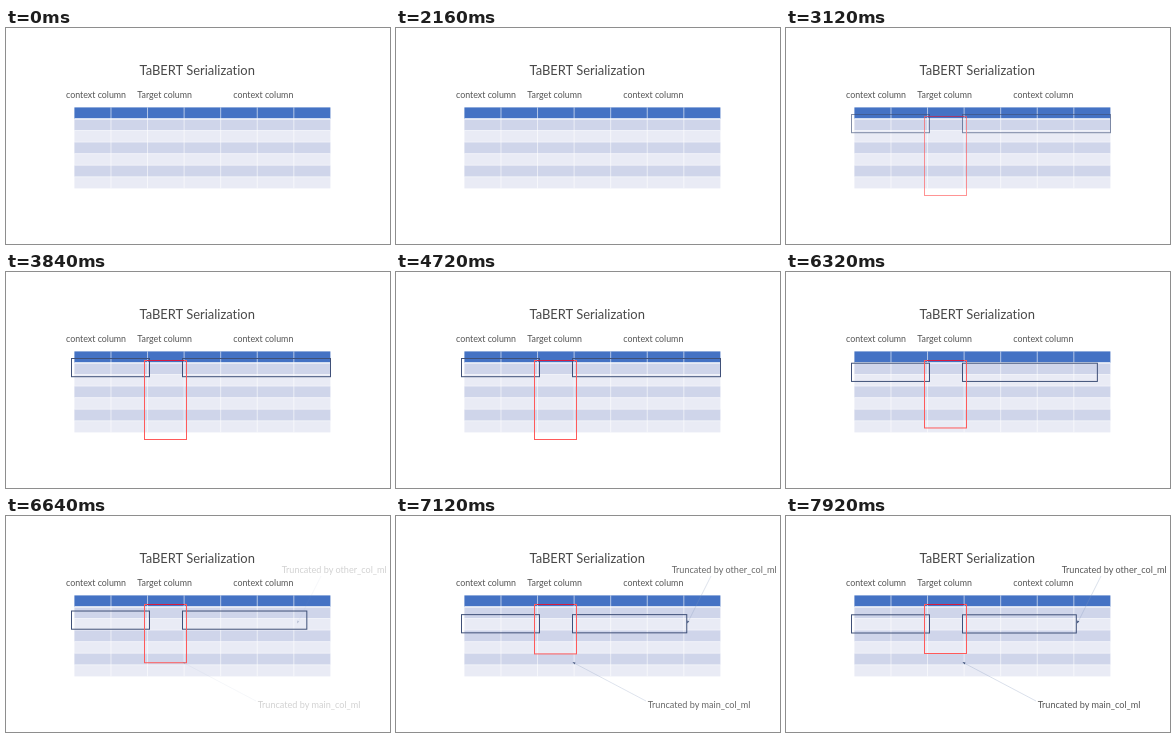
Animation of 384 by 216 pixels, one loop 8000 ms. Source, as an HTML page:

```html
<!DOCTYPE html>
<html lang="en">
<head>
<meta charset="utf-8">
<title>TaBERT Serialization</title>
<style>
  html, body { margin: 0; width: 100%; height: 100%; overflow: hidden; background: #fff; }
  svg { display: block; width: 100vw; height: 100vh; }
  text { font: 8.85px Lato, sans-serif; font-variant-ligatures: none; fill: #555; }
  text.title { font-size: 12.95px; fill: #484848; text-anchor: middle; }
  text.note { font-size: 9.1px; }
  #boxes { fill: none; stroke: #3f5078; stroke-width: 1; }
  #target { stroke: #ff5a5a; }
  #targetTop { stroke: #d41c40; }
  .arrow { stroke: #8095bb; stroke-width: .3; }
  .head { fill: #44577f; }
</style>
</head>
<body>
<svg viewBox="0 0 384 216">
  <text class="title" x="191.2" y="47">TaBERT Serialization</text>
  <text x="60" y="70">context column</text>
  <text x="131.3" y="70">Target column</text>
  <text x="227.3" y="70">context column</text>
  <g id="table"></g>
  <g id="boxes">
    <rect id="left" x="65.5" width="78"/>
    <rect id="right" x="176.5"/>
    <rect id="target" x="138.5" y="88.5" width="42"/>
    <path id="targetTop" d="M141 88.5H178"/>
  </g>
  <g id="notes">
    <text class="note" x="275.7" y="57">Truncated by other_col_ml</text>
    <text class="note" x="251.7" y="192">Truncated by main_col_ml</text>
    <path class="arrow" d="M315 60L292 106M250 185L178 147"/>
    <path class="head" d="M291 107.5l.2-3 2.2 1zM176.5 146l3 .4-1 2z"/>
  </g>
</svg>
<script>
const LOOP = 8000;
const $ = id => document.getElementById(id);
const clamp = v => Math.min(1, Math.max(0, v));
const span = (t, from, to) => clamp((t - from) / (to - from));
const mix = (a, b, p) => a + (b - a) * p;
const easeInOut = u => (1 - Math.cos(Math.PI * u)) / 2;

function set(id, attrs) {
  for (const name in attrs) $(id).setAttribute(name, attrs[name]);
}

function buildTable() {
  const x = 68.4, y = 79.4, w = 256, h = 81, rows = 7, cols = 7;
  const rowH = h / rows, colW = w / cols;
  let shapes = '', lines = '';
  for (let r = 0; r < rows; r++) {
    const fill = r === 0 ? '#4472c4' : r % 2 ? '#cfd5ea' : '#e9ebf5';
    const top = y + r * rowH;
    shapes += `<rect x="${x}" y="${top}" width="${w}" height="${rowH}" fill="${fill}"/>`;
    if (r) lines += `<path d="M${x} ${top}h${w}" stroke-width="${r === 1 ? 1.2 : 0.4}"/>`;
  }
  for (let c = 1; c < cols; c++) {
    lines += `<path d="M${x + c * colW} ${y}v${h}" stroke-width=".6"/>`;
  }
  $('table').innerHTML = shapes + `<g stroke="#fff">${lines}</g>`;
}

function draw(t) {
  const shrink = easeInOut(span(t, 5640, 7240));
  const y = mix(86.5, 98.8, shrink);
  set('left', { y, height: 18.2 });
  set('right', { y, height: 18.2, width: mix(148, 113.8, shrink) });
  set('target', { height: mix(79, 49, shrink) });
  set('boxes', { opacity: span(t, 2800, 3300) });
  set('notes', { opacity: span(t, 6440, 7200) });
}

function frame() {
  draw(performance.now() % LOOP);
  requestAnimationFrame(frame);
}

buildTable();
frame();
</script>
</body>
</html>
```
